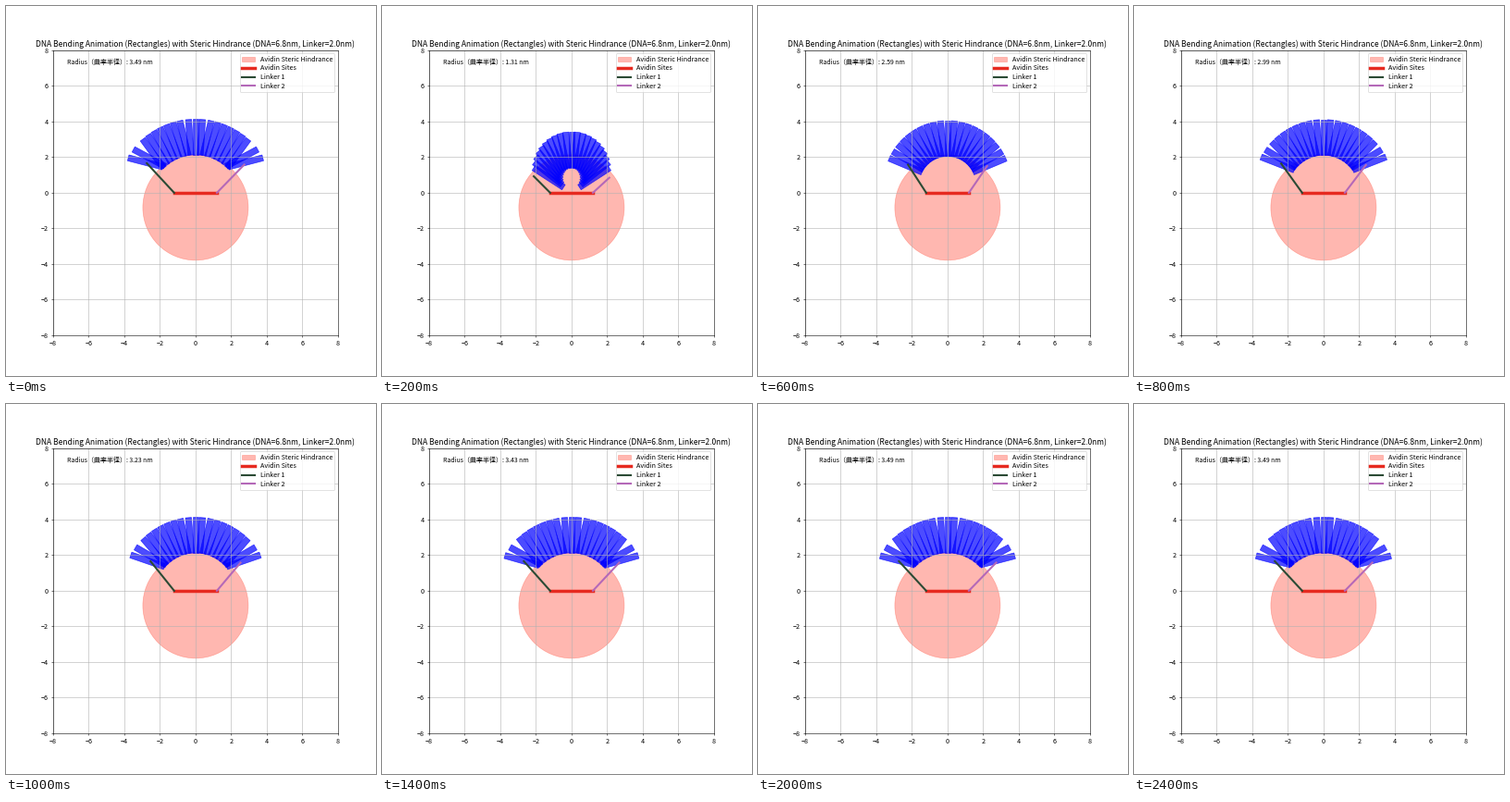
Animation, 400 px wide and 400 px high, one loop 2.5 s. Source, as a matplotlib script:

```python
import numpy as np
import matplotlib.pyplot as plt
from matplotlib.animation import FuncAnimation
from matplotlib.patches import Circle, Rectangle

plt.rcParams["font.family"] = ["Noto Sans CJK JP", "DejaVu Sans"]
plt.rcParams["font.size"] = 10.3

FRAMES, STEP_MS = 25, 100
N, BP, DIAM = 21, 0.34, 2.0
SITE = 1.2
K_REST = 1 / 3.494      # curvature of the relaxed arc
END_ANGLE = 53.6        # its half opening in degrees
TOP = 3.13              # arc apex when it rests on the disc
HINGES = [(0.15, 6), (0.85, 22), (0.95, 10)]    # place on the arc, kink in degrees


def excess_curvature(i):
    """Stretched exponential decay; the loop opens on the relaxed pose."""
    n = i or FRAMES - 1
    return 0.7527 * np.exp(-0.4558 * (n - 1) ** 0.925)


def pose(excess):
    k = K_REST + excess
    r = 1 / k
    curl = 1 - np.exp(-(excess / 0.3) ** 2)
    rest = np.exp(-excess / 0.055)

    u = np.linspace(-1, 1, N)
    phi = u * END_ANGLE * (k / K_REST) ** 0.65
    kinks = sum(kink * np.sign(u) * (abs(u) > at) for at, kink in HINGES)
    tilt = phi * (1.05 - 0.53 * curl) + rest * (kinks - 0.35 * phi)

    top = TOP - 0.77 * curl
    a = np.radians(phi)
    x, y = r * np.sin(a), top - r + r * np.cos(a)
    tip = 2.12 + 0.62 * rest, 1.66 - 0.8 * curl
    return r, x, y, tilt, tip


fig, ax = plt.subplots(figsize=(8, 8), dpi=50)
# A tenth of a pixel keeps grid lines off rounding ties
fig.subplots_adjust(left=0.12475, right=0.89975, bottom=0.11025, top=0.88025)
ax.set(xlim=(-8, 8), ylim=(-8, 8), aspect="equal")
ax.grid(True)
ax.set_title("DNA Bending Animation (Rectangles) with Steric Hindrance "
             "(DNA=6.8nm, Linker=2.0nm)", fontsize=12.2)

disc = ax.add_patch(Circle((0, -0.83), 2.96, color="#ff6150", alpha=0.45,
                           label="Avidin Steric Hindrance"))
sites, = ax.plot([-SITE, SITE], [0, 0], color="#e62a20", lw=5, label="Avidin Sites")
link1, = ax.plot([], [], color="#2b4a34", lw=3, label="Linker 1")
link2, = ax.plot([], [], color="#b468b8", lw=3, label="Linker 2")
pairs = [ax.add_patch(Rectangle((0, 0), BP, DIAM, rotation_point="center",
                                color="blue", alpha=0.7)) for _ in range(N)]
label = ax.text(-7.2, 7.2, "", fontsize=10)
ax.legend(handles=[disc, sites, link1, link2], loc="upper right",
          labelspacing=0.25, borderpad=0.3)


def update(i):
    r, xs, ys, tilts, (lx, ly) = pose(excess_curvature(i))
    for rect, x, y, tilt in zip(pairs, xs, ys, tilts):
        rect.set_xy((x - BP / 2, y - DIAM / 2))
        rect.set_angle(-tilt)
    link1.set_data([-SITE, -lx], [0, ly])
    link2.set_data([SITE, lx], [0, ly - 0.08])
    label.set_text(f"Radius（曲率半径）: {r:.2f} nm")
    return [*pairs, link1, link2, label]


anim = FuncAnimation(fig, update, frames=FRAMES, interval=STEP_MS,
                     repeat=True, repeat_delay=0)
plt.show()
```
